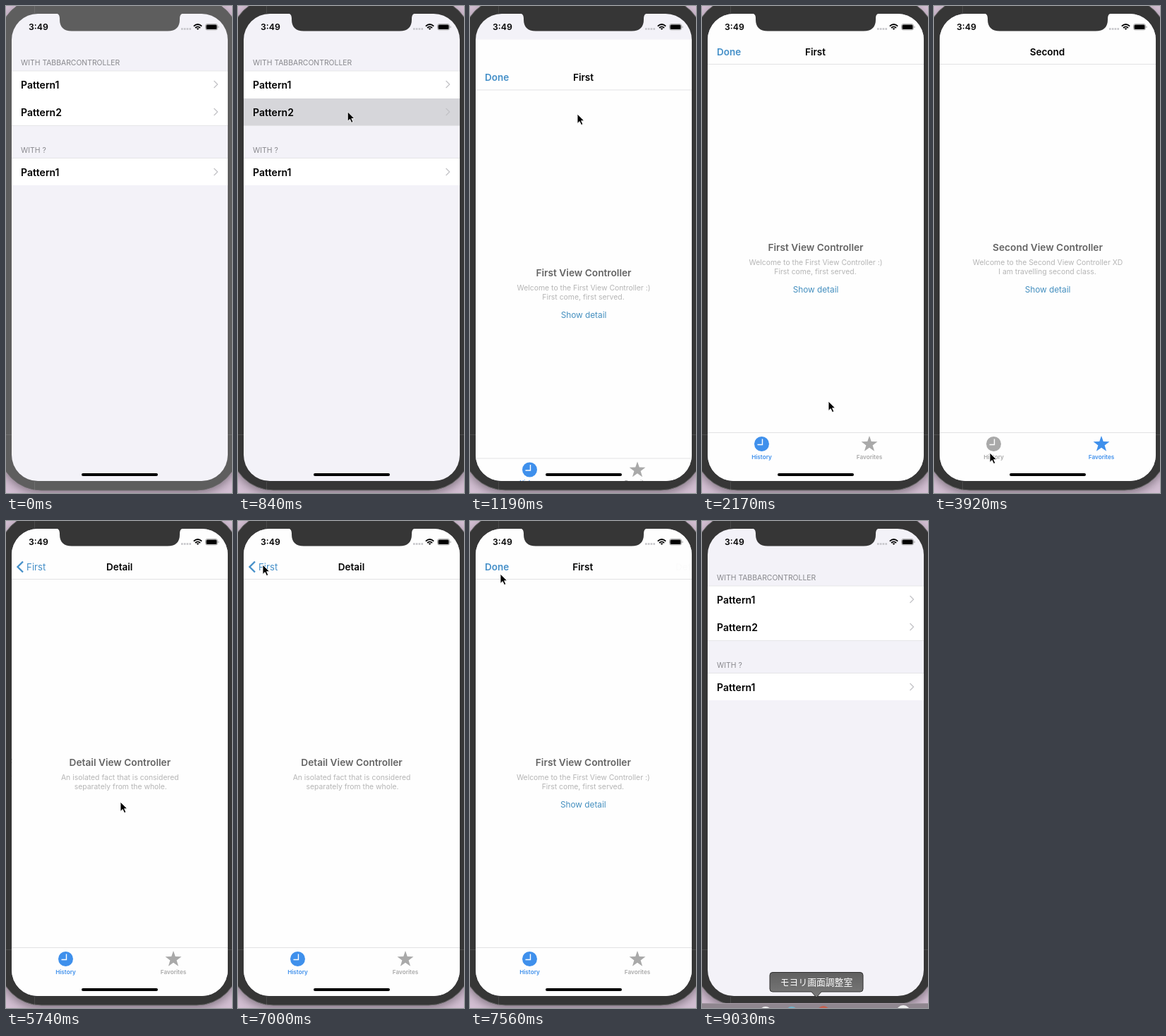
Write an HTML page that moves like this. It is 320 by 690 pixels and loops after 9.24 s.

```html
<!DOCTYPE html>
<html lang="en">
<head>
<meta charset="utf-8">
<title>Tab bar demo</title>
<style>
  html, body { margin: 0; width: 100%; height: 100%; overflow: hidden; background: #d3bfd3; }
  svg { display: block; width: 320px; height: 690px; font-family: Inter, Roboto, sans-serif; }
  .bold { font-weight: 600; }
  .title { font-size: 13.5px; font-weight: 600; text-anchor: middle; }
  .blue { fill: #448fc8; }
  .section { font-size: 10.4px; fill: #88888d; }
  .row { font-size: 14px; font-weight: 600; }
  .chevron { fill: none; stroke: #c3c3c7; stroke-width: 1.3; }
  .head { font-size: 13.7px; font-weight: 600; fill: #646464; text-anchor: middle; }
  .note { font-size: 10.4px; fill: #b5b5b5; text-anchor: middle; }
  .link { font-size: 11.8px; fill: #448fbf; text-anchor: middle; }
  .tab { font-size: 8.2px; font-weight: 600; text-anchor: middle; }
  .line { stroke: #e2e2e4; }
  .tip { font: 12.8px "Noto Sans CJK JP", "Noto Sans CJK", sans-serif; fill: #fff; text-anchor: middle; }
</style>
</head>
<body>
<svg viewBox="0 0 320 690">
  <defs>
    <clipPath id="screen"><rect x="8" y="11" width="306" height="662" rx="37"/></clipPath>
    <clipPath id="content"><rect x="8" y="11" width="306" height="662"/></clipPath>
    <filter id="blur"><feGaussianBlur stdDeviation="7"/></filter>
    <linearGradient id="tipFill" x2="0" y2="1">
      <stop stop-color="#606060"/><stop offset="1" stop-color="#7a7a7a"/>
    </linearGradient>
  </defs>

  <rect x="-10" y="-5" width="340" height="695" rx="60" opacity=".4" filter="url(#blur)"/>
  <rect id="bezel" x="-10" y="-11" width="340" height="697" rx="60" stroke="#666"/>
  <path d="M40.500 0V10M40.500 674V686M0 607.500H8M314 607.500H320" stroke="#fff" stroke-opacity=".1"/>

  <g clip-path="url(#screen)">
    <rect x="8" y="11" width="306" height="662" fill="#f3f2f8"/>
    <g id="list">
      <path d="M8 92H314V169.500H8zM8 216H314V254H8z" fill="#fff"/>
      <rect id="pressedRow" x="8" y="131" width="306" height="38.500" fill="#d6d6da"/>
      <path d="M8 92H314M8 169.500H314M8 215.500H314" class="line" stroke-opacity=".8"/>
      <text x="21" y="84" class="section">WITH TABBARCONTROLLER</text>
      <text x="21" y="208" class="section">WITH ?</text>
      <text x="21" y="116.500" class="row">Pattern1</text>
      <text x="21" y="155.500" class="row">Pattern2</text>
      <text x="21" y="240.500" class="row">Pattern1</text>
      <path class="chevron" d="M294.500 106l5 5-5 5m0 29l5 5-5 5m0 75l5 5-5 5"/>
    </g>

    <g id="modal">
      <rect x="8" y="11" width="306" height="664" fill="#fefefe"/>
      <g clip-path="url(#content)">
        <g id="first">
          <text x="161" y="347" class="head">First View Controller</text>
          <text x="161" y="367" class="note">Welcome to the First View Controller :)</text>
          <text x="160.500" y="380" class="note">First come, first served.</text>
          <text x="161" y="405.500" class="link" id="link">Show detail</text>
        </g>
        <g id="second">
          <text x="161" y="347" class="head">Second View Controller</text>
          <text x="161" y="367" class="note">Welcome to the Second View Controller XD</text>
          <text x="160.500" y="380" class="note">I am travelling second class.</text>
          <text x="161" y="405.500" class="link">Show detail</text>
        </g>
        <rect id="dim" x="8" y="83" width="306" height="521"/>
        <g id="detail">
          <rect x="8" y="83" width="306" height="521" fill="#fefefe"/>
          <text x="161" y="347" class="head">Detail View Controller</text>
          <text x="161" y="367" class="note">An isolated fact that is considered</text>
          <text x="162" y="380" class="note">separately from the whole.</text>
        </g>
      </g>
      <path d="M8 82.500H314M8 604.500H314" class="line"/>
      <text id="done" x="21" y="70" font-size="13.500" class="bold blue">Done</text>
      <text id="firstTitle" x="160.500" y="70" class="title">First</text>
      <text id="secondTitle" x="160.500" y="70" class="title">Second</text>
      <text id="detailTitle" x="160.500" y="70" class="title">Detail</text>
      <path id="backArrow" d="M24 57.500L16.500 65L24 72.500" fill="none" stroke="#448fc8" stroke-width="2.300"/>
      <text id="backLabel" x="29" y="70" font-size="13.200" class="blue">First</text>
      <g id="historyTab">
        <circle cx="84.500" cy="620.500" r="10.500"/>
        <path d="M85.500 613.500V621.500H78.500" fill="none" stroke="#fff" stroke-width="1.400"/>
        <text x="84.500" y="642" class="tab">History</text>
      </g>
      <g id="favoritesTab">
        <path id="star"/>
        <text x="237" y="642" class="tab">Favorites</text>
      </g>
    </g>
    <rect x="107" y="662" width="108" height="4" rx="2"/>
  </g>

  <path id="notch" d="M70 10Q76 11 76 17V19Q76 35.500 93 35.500H229Q246 35.500 246 19V17Q246 11 252 10z"/>
  <text x="32" y="34" font-size="12.300" class="bold">3:49</text>
  <path d="M248 32.500H262" stroke="#c4c4c8" stroke-width="2.400" stroke-dasharray="2.600 1.200"/>
  <g fill="none" stroke="#000" stroke-width="1.800">
    <path d="M265.800 28.600Q271.500 23.300 277.200 28.600M268 31Q271.500 27.700 275 31"/>
    <path d="M270 31.900H273L271.500 33.400z" fill="#000" stroke-width=".8"/>
  </g>
  <rect x="282.500" y="25.500" width="17" height="8.500" rx="2.500" fill="none" stroke="#aaa"/>
  <rect x="283.500" y="26.500" width="15" height="6.500" rx="1.500"/>
  <path d="M301 28.500v2.500" stroke="#aaa"/>

  <g id="dock">
    <rect y="683" width="320" height="12" fill="#8f868f"/>
    <path d="M0 683.500H320" stroke="#a59ba5"/>
    <circle cx="90" cy="697" r="9" fill="#f4f4f4"/>
    <circle cx="127" cy="697" r="9" fill="#6fb4cc"/>
    <circle cx="172" cy="696" r="9" fill="#c4604f"/>
    <circle cx="285" cy="696" r="10" fill="#eee"/>
  </g>
  <g id="tooltip">
    <path d="M100 639.500H224Q228 639.500 228 643.500V663Q228 667 224 667H169L162 675L155 667H100Q96 667 96 663V643.500Q96 639.500 100 639.500z"
      fill="url(#tipFill)" stroke="#303030"/>
    <text x="162" y="657.500" class="tip">モヨリ画面調整室</text>
  </g>
  <path id="cursor" d="M0 0V13.500L3.200 10.600L5.500 15.600L7.800 14.500L5.600 9.700H9.700z" stroke="#fff" stroke-width=".9"/>
</svg>
<script>
const LOOP = 9240, STEP = 70, SCREEN_W = 306, SCREEN_H = 662;
const $ = id => document.getElementById(id);
const move = (id, x, y = 0) => $(id).setAttribute('transform', `translate(${x} ${y})`);
const fade = (id, opacity) => $(id).setAttribute('opacity', opacity);
const paint = (id, color) => $(id).setAttribute('fill', color);
const within = (t, from, to) => +(t >= from && t < to);
const clamp = v => Math.min(1, Math.max(0, v));

// Critically damped spring, 0 to 1
const spring = (t, start) => {
  const x = Math.max(0, t - start) * 0.018;
  return 1 - (1 + x) * Math.exp(-x);
};

// time, x, y of the pointer tip
const pointerPath = [
  [0, 235, 705], [700, 156, 149], [1190, 152, 153], [1890, 179, 560],
  [2170, 179, 560], [2520, 238, 629], [3080, 238, 629], [3850, 79, 633],
  [4480, 79, 633], [4900, 162, 398], [6370, 162, 398], [7000, 35, 62],
  [7280, 36, 63], [7560, 43, 75], [7840, 42, 71], [8470, 42, 71], [8750, 205, 705], [LOOP, 205, 705]
];

function pointerAt(t) {
  const i = pointerPath.findIndex(p => p[0] > t);
  const [t0, x0, y0] = pointerPath[i - 1], [t1, x1, y1] = pointerPath[i];
  const u = (t - t0) / (t1 - t0), e = u * u * (3 - 2 * u);
  return [x0 + (x1 - x0) * e, y0 + (y1 - y0) * e];
}

$('star').setAttribute('d', 'M' + Array.from({ length: 10 }, (_, i) => {
  const r = i % 2 ? 4.8 : 12, a = i * Math.PI / 5;
  return [237 + r * Math.sin(a), 621 - r * Math.cos(a)].map(v => v.toFixed(1));
}).join('L') + 'z');

function draw(t) {
  const shown = spring(t, 933) - spring(t, 7890);
  const push = spring(t, 5230) - spring(t, 7170);
  const onSecond = within(t, 2520, 3990);

  const bezelColor = t < 350 ? '#5e5e5e' : '#363636';
  paint('bezel', bezelColor);
  paint('notch', bezelColor);
  fade('pressedRow', within(t, 840, 1400));
  move('modal', 0, (1 - shown) * SCREEN_H);
  fade('modal', +(shown > 0.001));

  fade('first', 1 - onSecond);
  fade('second', onSecond);
  move('first', -0.3 * SCREEN_W * push);
  move('detail', SCREEN_W * (1 - push));
  fade('detail', +(push > 0.001));
  fade('dim', 0.1 * push);
  fade('link', t < 5040 ? 1 : t < 5180 ? 0.3 : 0.3 + 0.7 * clamp((t - 5180) / 250));

  fade('done', (1 - onSecond) * (1 - push) * (within(t, 7840, 7950) ? 0.3 : 1));
  fade('firstTitle', (1 - onSecond) * (1 - push));
  move('firstTitle', -118 * push);
  fade('secondTitle', onSecond);
  fade('detailTitle', push);
  move('detailTitle', 150 * (1 - push));
  fade('backArrow', push);
  fade('backLabel', push * (within(t, 7080, 7170) ? 0.3 : 1));
  move('backLabel', 118 * (1 - push));

  const tabColors = ['#3f90ec', '#a9a9a9'];
  paint('historyTab', tabColors[onSecond]);
  paint('favoritesTab', tabColors[1 - onSecond]);

  move('dock', 0, 8 * (1 - clamp((t - 8820) / 140)));
  fade('dock', +(t >= 8890));
  fade('tooltip', +(t >= 8960));
  move('cursor', ...pointerAt(t));
}

function tick() {
  draw(Math.floor(performance.now() % LOOP / STEP) * STEP);
  requestAnimationFrame(tick);
}
tick();
</script>
</body>
</html>
```
